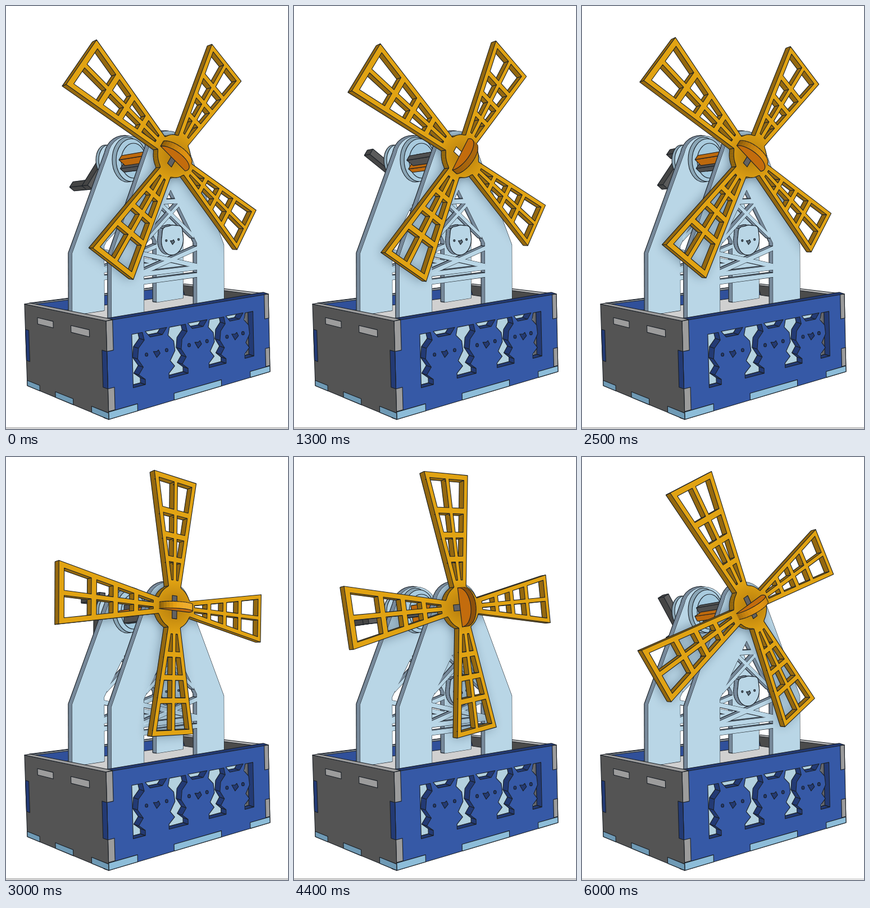
An HTML page with a canvas for the animation above (6100 ms loop, 502 by 752 pixels).

```html
<!DOCTYPE html>
<html lang="en">
<head>
<meta charset="utf-8">
<title>Windmill</title>
<style>
html, body { margin: 0; width: 100%; height: 100%; overflow: hidden; background: #fff; }
canvas { display: block; }
</style>
</head>
<body>
<canvas id="stage" width="502" height="752"></canvas>
<script>
const ctx = document.getElementById('stage').getContext('2d');
const { sin, cos, PI, hypot, abs, max } = Math;
const INK = '#1b2026', STEP = 100, STEPS = 61;
const SKY = '#b9d6e6', SLATE = '#77899a', BLUE = '#3659a6', NAVY = '#233a74';
const GREY = '#545454', EDGE = '#9c9c9c', PALE = '#8dbdd9', DUSK = '#6f9ab5';

const shift = (ring, dx, dy) => ring.map(([x, y]) => [x + dx, y + dy]);
const rect = (x0, x1, y0, y1) => [[x0, y0], [x1, y0], [x1, y1], [x0, y1]];
const arc = (from, to, n, f) => Array.from({ length: n + 1 }, (_, i) => f(from + (to - from) * i / n));
const area = ring => ring.reduce((sum, [x, y], i) => {
  const [nx, ny] = ring[(i + 1) % ring.length];
  return sum + x * ny - nx * y;
}, 0);

function trace(rings) {
  ctx.beginPath();
  for (const ring of rings) {
    ring.forEach(([x, y], i) => i ? ctx.lineTo(x, y) : ctx.moveTo(x, y));
    ctx.closePath();
  }
}

function outlinePath(color = INK, width = 1.1) {
  ctx.strokeStyle = color;
  ctx.lineWidth = width;
  ctx.stroke();
}

function shape(fill, rings, outlined = true) {
  trace(rings);
  ctx.fillStyle = fill;
  ctx.fill('evenodd');
  if (outlined) outlinePath();
}

function oval(fill, x, y, rx, ry) {
  ctx.beginPath();
  ctx.ellipse(x, y, rx, ry, 0, 0, 2 * PI);
  ctx.fillStyle = fill;
  ctx.fill();
  outlinePath();
}

function segment([x0, y0], [x1, y1]) {
  ctx.beginPath();
  ctx.moveTo(x0, y0);
  ctx.lineTo(x1, y1);
  outlinePath();
}

function isCorner(ring, i) {
  const n = ring.length, [x, y] = ring[i], [px, py] = ring[(i + n - 1) % n], [nx, ny] = ring[(i + 1) % n];
  const ax = x - px, ay = y - py, bx = nx - x, by = ny - y;
  return abs(ax * by - ay * bx) > 0.5 * hypot(ax, ay) * hypot(bx, by);
}

// Extruded plate: the first ring is the outline, the others are holes.
function plate(front, back, face, side) {
  front.forEach((ring, k) => {
    const flip = (area(ring) > 0) !== (k === 0);
    const f = flip ? [...ring].reverse() : ring;
    const b = flip ? [...back[k]].reverse() : back[k];
    f.forEach((p, i) => {
      const j = (i + 1) % f.length, quad = [p, f[j], b[j], b[i]];
      if (area(quad) >= 0) return;
      const color = typeof side === 'function' ? side(i / f.length) : side;
      shape(color, [quad], false);
      outlinePath(color, 0.6);
      segment(b[i], b[j]);
      if (isCorner(f, i)) segment(p, b[i]);
      if (isCorner(f, j)) segment(f[j], b[j]);
    });
  });
  shape(face, front);
}

// Maps the unit square to a quad with upright sides; the higher side is nearer.
function quadMap([x0, y0], [x1, y1], [x2, y2], [x3, y3]) {
  const ratio = (y3 - y0) / (y2 - y1);
  return ([s, t]) => {
    const e = ratio * s / (1 + (ratio - 1) * s);
    const top = [x0 + (x1 - x0) * e, y0 + (y1 - y0) * e];
    const low = [x3 + (x2 - x3) * e, y3 + (y2 - y3) * e];
    return [top[0] + (low[0] - top[0]) * t, top[1] + (low[1] - top[1]) * t];
  };
}

// Perspective of the rotor space: u right, v up, n towards the viewer.
function project(u, v, n) {
  const w = 1 + 0.1437 * u - 0.009 * v - 0.173 * n;
  return [(300 + 217 * u - 1.7 * v + 93 * n) / w, (267 + 58.9 * u - 229.3 * v - 68 * n) / w];
}
const spinner = angle => (p, q, n) =>
  project(p * cos(angle) - q * sin(angle), -p * sin(angle) - q * cos(angle), n);

function prism(place, rings, n0, n1, face, side) {
  const at = n => rings.map(ring => ring.map(([p, q]) => place(p, q, n)));
  plate(at(n1), at(n0), face, side);
}

// Rotor: four blades around a hub, each with two columns of windows
const TIP = 1.012;
const turn = (ring, a) => ring.map(([r, w]) => [r * cos(a) - w * sin(a), r * sin(a) + w * cos(a)]);
const halfWidth = r => 0.062 + (r - 0.16) * 0.177;
const hubArc = arc(0.45, PI / 2 - 0.45, 5, a => [0.168 * cos(a), 0.168 * sin(a)]);
const outline = [], windows = [];
for (let k = 0; k < 4; k++) {
  const a = k * PI / 2, root = halfWidth(0.16), tip = halfWidth(TIP);
  outline.push(...turn([[0.16, -root], [TIP, -tip], [TIP, tip], [0.16, root], ...hubArc], a));
  for (let row = 0; row < 4; row++) for (const sign of [-1, 1]) {
    const r0 = 0.21 + 0.183 * row, r1 = row < 3 ? r0 + 0.14 : TIP - 0.04;
    const inner = sign * 0.017, outer = r => sign * (halfWidth(r) - 0.038);
    windows.push(turn([[r0, inner], [r1, inner], [r1, outer(r1)], [r0, outer(r0)]], a));
  }
}
const rotor = [outline, ...windows];

// Tower: arched frame, crossed beams and a small cat
const onTower = quadMap([187, 222], [387, 226], [388, 529], [188, 562]);
const mirror = half => [...half, ...half.map(([s, t]) => [1 - s, t]).reverse()];
const dome = arc(PI * 1.06, PI * 1.94, 14, a => [0.485 + 0.183 * cos(a), 0.12 + 0.125 * sin(a)]);
const frame = [[0, 0.655], ...dome, [1, 0.655], [1, 1], [0.74, 1], [0.74, 0.63], [0.5, 0.32], [0.265, 0.63], [0.265, 1], [0, 1]];
const beam = (s0, t0, s1, t1) => [[s0, t0 - 0.012], [s1, t1 - 0.012], [s1, t1 + 0.012], [s0, t0 + 0.012]];
const cross = (top, t0, low, t1) => [beam(top, t0, 1 - low, t1), beam(1 - top, t0, low, t1)];
const ears = a => sin(a) < 0 ? 0.18 * sin(2 * a) ** 6 : 0;
const towerCat = arc(0, 2 * PI, 40, a => [0.515 + 0.098 * (1 + ears(a)) * cos(a), 0.6 + 0.083 * (1 + ears(a)) * sin(a)]);
const tower = [
  frame, beam(0.43, 0.385, 0.58, 0.385), ...cross(0.42, 0.4, 0.29, 0.59), ...cross(0.26, 0.66, 0.26, 0.76),
  beam(0.26, 0.77, 0.745, 0.77), beam(0.26, 0.812, 0.745, 0.812), towerCat
].map(ring => ring.map(onTower));
const rearTower = tower.map(ring => ring.map(([x, y]) => [x * 0.985 - 67, y * 0.94 + 22]));

function drawTower(parts, place) {
  for (const part of parts) plate([part], [shift(part, -7, -1)], SKY, SLATE);
  for (const part of parts) shape(SKY, [part], false);
  const cat = parts[parts.length - 1];
  trace([cat]);
  outlinePath();

  // Soft shadow of the rotor
  ctx.save();
  trace(parts);
  ctx.clip();
  ctx.shadowColor = 'rgba(20,40,60,.6)';
  ctx.shadowBlur = 20;
  shape('#000', rotor.map(r => r.map(([p, q]) => place(p, q, -0.05))), false);
  ctx.restore();
}

// Box walls
const frontWall = quadMap([178, 560], [467, 512], [470, 650], [183, 735]);
const leftWall = quadMap([33, 530], [178, 560], [183, 735], [38, 675]);
const tab = (wall, color, ...box) => shape(color, [rect(...box).map(wall)]);

// Half of a cat's side contour, as distance from its middle and height
const contour = [[0.075, 0.185], [0.066, 0.27], [0.098, 0.345], [0.104, 0.455], [0.075, 0.555], [0.1, 0.625], [0.066, 0.69], [0.066, 0.745]];
const catMiddles = [0.258, 0.503, 0.748];
const side = (middle, sign) => contour.map(([d, t]) => [middle + sign * d, t]);
const gaps = [0, 1, 2, 3].map(i => [
  ...(i > 0 ? side(catMiddles[i - 1], 1) : [[0.127, 0.185], [0.127, 0.745]]),
  ...(i < 3 ? side(catMiddles[i], -1) : [[0.88, 0.185], [0.88, 0.745]]).reverse()
]);
const crowns = catMiddles.map(m => [[m - 0.06, 0.18], [m + 0.06, 0.18], [m + 0.034, 0.25], [m - 0.034, 0.25]]);
const panel = [rect(0, 1, 0, 1), ...gaps, ...crowns].map(ring => ring.map(frontWall));

function drawInterior() {
  shape('#d0d0d0', [[[42, 530], [315, 497], [460, 514], [188, 557]]]);
  shape('#30509a', [[[42, 528], [313, 494], [318, 513], [105, 541], [60, 560]]]);
  shape('#8f979f', [[[33, 530], [313, 494], [318, 497], [43, 531]]]);
  shape('#4b4b4b', [[[313, 496], [463, 515], [400, 526], [318, 514]]]);
  shape('#b3b3b3', [[[310, 496], [318, 494], [467, 512], [459, 515]]]);
}

function drawBox() {
  shape('#b3d1df', [rect(0.12, 0.89, 0.17, 0.76).map(frontWall)], false);
  shape('#65666b', [rect(0.82, 0.89, 0.17, 0.76).map(frontWall)], false);
  plate(panel, panel.map(r => shift(r, -9, -3)), BLUE, NAVY);
  for (const s of [0, 0.968]) {
    tab(frontWall, EDGE, s, s + 0.032, 0, 0.31);
    tab(frontWall, EDGE, s, s + 0.032, 0.69, 0.92);
  }
  for (const [s0, s1] of [[0, 0.147], [0.35, 0.647], [0.85, 1]]) tab(frontWall, PALE, s0, s1, 0.925, 1);

  tab(leftWall, GREY, 0, 1, 0, 1);
  shape(EDGE, [[[33, 530], [43, 528], [190, 557], [178, 560]]]);
  for (const s of [0.18, 0.61]) tab(leftWall, EDGE, s, s + 0.21, 0.13, 0.205);
  for (const [s0, s1] of [[0, 0.18], [0.39, 0.61], [0.82, 1]]) tab(leftWall, DUSK, s0, s1, 0.935, 1);
  for (const s of [0, 0.95]) tab(leftWall, NAVY, s, s + 0.05, 0.31, 0.69);
}

function drawFace(wall, middle, t, width, size, color) {
  for (const sign of [-1, 1]) oval(color, ...wall([middle + sign * width, t]), 0.8 * size, size);
  const [x, y] = wall([middle, t + 0.01]);
  shape(color, [[[x - 2 * size, y - size], [x, y - size], [x + size, y - 2 * size], [x + 2 * size, y], [x, y + 2.5 * size]]]);
}

function drawCrank(place) {
  prism(place, [rect(-0.03, 0.03, 0.17, 0.235)], -1.38, -1.1, '#5c5c5c', '#454545');
  prism(place, [rect(-0.03, 0.03, -0.235, 0.235)], -1.15, -1.05, '#5c5c5c', '#454545');
}

// Cross-shaped axle: four arms, the farthest drawn first
function drawAxle(place, angle) {
  const arms = [0, 1, 2, 3].sort((a, b) => cos(angle + b * PI / 2) - cos(angle + a * PI / 2));
  for (const k of arms) {
    const color = k % 2 ? '#505050' : '#bd690d';
    prism(place, [turn(rect(0, 0.078, -0.024, 0.024), k * PI / 2)], -0.66, -0.1, color, color);
  }
}

function drawRotor(place, angle) {
  const gold = ctx.createRadialGradient(300, 267, 8, 300, 267, 48);
  gold.addColorStop(0, '#bb820e');
  gold.addColorStop(1, '#e1a313');
  prism(place, rotor, -0.056, 0, gold, '#94680f');

  for (const end of [-1, 1]) {
    const u = -end * sin(angle), v = -end * cos(angle);
    const open = u < 0 && v > 0.4 && v < 0.72;
    shape(open ? '#f4f4f4' : '#626262', [rect(-0.024, 0.024, 0, end * 0.09).map(([p, q]) => place(p, q, 0))]);
  }
}

// Half-disc key standing out of the hub
function drawKey(place, angle) {
  const half = q => arc(0, PI, 18, a => place(0.152 * cos(a), q, 0.13 * sin(a)));
  const near = area(half(0)) > 0 ? -0.026 : 0.026;
  const glow = cos(angle) ** 2;
  const rim = along => `hsl(${32 + 8 * glow} 85% ${29 + 27 * glow * max(0, sin(PI * along))}%)`;
  plate([half(near)], [half(-near)], '#c36c0d', rim);
}

function draw(step) {
  const angle = (34.4 - 7.13 * step) * PI / 180, place = spinner(angle);
  ctx.fillStyle = '#fff';
  ctx.fillRect(0, 0, 502, 752);
  ctx.fillStyle = step === STEPS - 1 ? '#dedede' : '#bcbcbc';
  ctx.fillRect(0, 749, 502, 2);
  ctx.fillStyle = '#ebebeb';
  ctx.fillRect(0, 751, 502, 1);

  drawInterior();
  drawCrank(place);
  oval('#8fa9b8', 177, 274, 17, 27);
  oval(SKY, 182, 274, 17, 27);
  drawTower(rearTower, place);
  oval('#8aa5b5', 216, 273, 27, 40);
  oval('#a9cbde', 223, 274, 27, 38);
  oval('#a3c8dd', 227, 275, 22, 31);
  drawAxle(place, angle);
  drawTower(tower, place);
  drawFace(onTower, 0.515, 0.6, 0.055, 1.9, '#5d6f7c');
  drawBox();
  for (const middle of catMiddles) drawFace(frontWall, middle, 0.43, 0.056, 3, NAVY);
  drawRotor(place, angle);
  drawKey(place, angle);
}

ctx.lineJoin = 'round';
let shown = -1;
function tick() {
  const step = Math.floor(performance.now() / STEP) % STEPS;
  if (step !== shown) draw(shown = step);
  requestAnimationFrame(tick);
}
tick();
</script>
</body>
</html>
```
